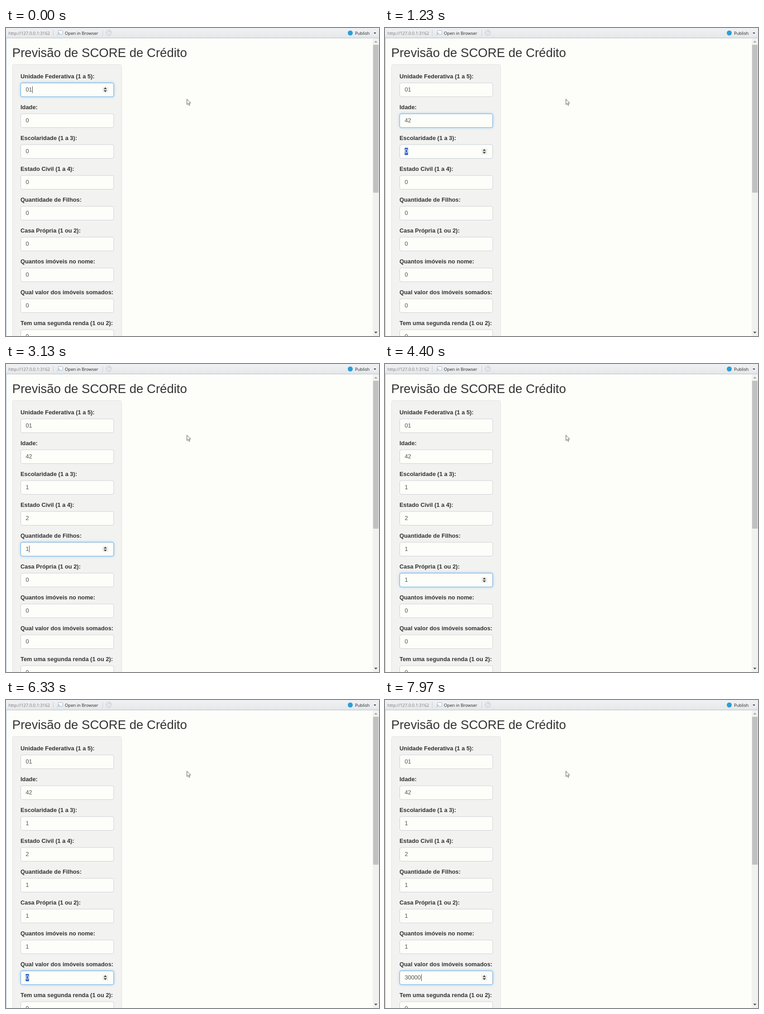
These frames come from a looping animation (824x679 px, 8000 ms). An HTML page:

```html
<!DOCTYPE html>
<html lang="pt">
<head>
<meta charset="utf-8">
<title>Previsão de SCORE de Crédito</title>
<style>
  html, body { margin: 0; width: 100%; height: 100%; overflow: hidden; background: #fdfdf9; }
  svg { display: block; }
  text { font-family: "Liberation Sans", Arial, sans-serif; font-size: 12.87px; fill: #555; white-space: pre; }
  .title { font-size: 27.57px; fill: #333; }
  .label { font-weight: bold; fill: #333; }
  .bar text { font-family: "Open Sans", "Noto Sans", sans-serif; font-size: 9.45px; fill: #222; }
  .bar .url { fill: #777; }
</style>
</head>
<body>
<svg id="stage" width="824" height="679" viewBox="0 0 824 679">
  <defs>
    <linearGradient id="chrome" x2="0" y2="1">
      <stop offset="0" stop-color="#f0f1f3"/>
      <stop offset="1" stop-color="#e5e7ea"/>
    </linearGradient>
    <filter id="blur" x="-10%" y="-60%" width="120%" height="220%">
      <feGaussianBlur stdDeviation="3.4"/>
    </filter>
  </defs>
  <rect width="824" height="679" fill="#fdfdf9"/>

  <text class="title" x="13.8" y="63.5">Previsão de SCORE de Crédito</text>
  <rect x="14.5" y="80.5" width="241" height="620" rx="4" fill="#f2f2f1" stroke="#e2e2e4"/>
  <g id="form"></g>

  <g class="scroll">
    <rect x="810" y="23" width="14" height="656" fill="#f1f1ef"/>
    <rect x="811" y="37" width="12" height="326" fill="#c1c1c1"/>
    <path d="M813.5 32h7l-3.5-4z" fill="#a3a3a3"/>
    <path d="M813.5 669.5h7l-3.5 4z" fill="#505050"/>
  </g>

  <g class="bar">
    <rect width="824" height="22" fill="url(#chrome)"/>
    <path d="M0 22H824M.5 22V679" fill="none" stroke="#a6bdd0"/>
    <path d="M104.500 4V18M213.500 4V18" stroke="#c9ccd0"/>
    <text class="url" x="5.500" y="15">http://127.0.0.1:3162</text>
    <g fill="#f7f9fb" stroke="#a9b9c9">
      <rect x="115.500" y="5.500" width="10" height="8.500" rx="1"/>
      <path d="M112.500 16.500l5-5M114.500 11h3.500v3.500" fill="none"/>
    </g>
    <text x="130" y="15">Open in Browser</text>
    <g fill="none" stroke="#b5bfca">
      <circle cx="227" cy="10.500" r="6" fill="#eef1f4"/>
      <path d="M229.500 8.500a3.200 3.200 0 1 0 .6 3M230 6.800v2.500h-2.600"/>
    </g>
    <circle cx="760.500" cy="11" r="5.500" fill="#2a9fd8"/>
    <text x="771" y="15">Publish</text>
    <path d="M812.500 10h5l-2.500 3z" fill="#222"/>
  </g>

  <path d="M399.700 156.800v12l2.700-2.500 1.900 4.300 1.900-.8-1.900-4.200h3.600z" fill="#fff" stroke="#444" stroke-width=".9"/>
</svg>
<script>
const LOOP = 8000, PITCH = 68, DIGIT = 7.16, FADE = 150, BLINK = 500;

// label, focus time, then [time, typed value] pairs
const fields = [
  ['Unidade Federativa (1 a 5):', -600, [[-400, '0'], [-100, '01']]],
  ['Idade:', 420, [[700, '4'], [860, '42']]],
  ['Escolaridade (1 a 3):', 1210, [[1640, '1']]],
  ['Estado Civil (1 a 4):', 2060, [[2380, '2']]],
  ['Quantidade de Filhos:', 2700, [[2980, '1']]],
  ['Casa Própria (1 ou 2):', 3430, [[3780, '1']]],
  ['Quantos imóveis no nome:', 4700, [[5080, '1']]],
  ['Qual valor dos imóveis somados:', 5860,
    [[6860, '3'], [7200, '30'], [7380, '300'], [7560, '3000'], [7740, '30000']]],
  ['Tem uma segunda renda (1 ou 2):', Infinity, []],
];

const form = document.getElementById('form');

function add(parent, tag, attrs, text) {
  const el = document.createElementNS('http://www.w3.org/2000/svg', tag);
  for (const k in attrs) el.setAttribute(k, attrs[k]);
  if (text) el.textContent = text;
  parent.appendChild(el);
  return el;
}

function makeField([label, start, keys], i) {
  const g = add(form, 'g', { transform: `translate(0 ${i * PITCH})` });
  const box = { x: 32.5, y: 121, width: 205.5, height: 30.5, rx: 3.7 };
  const glow = add(g, 'rect', { ...box, fill: '#66afe9', filter: 'url(#blur)' });
  add(g, 'text', { class: 'label', x: 32, y: 110.8 }, label);
  add(g, 'rect', { ...box, fill: '#fdfdf9', stroke: '#cfcfd6' });
  const ring = add(g, 'rect', { ...box, fill: 'none', stroke: '#66afe9' });
  const mark = add(g, 'rect', { x: 43.5, y: 128, width: 7.3, height: 16, fill: '#3464c8' });
  const value = add(g, 'text', { x: 43.4, y: 140.3 });
  const caret = add(g, 'rect', { y: 128.5, width: 1, height: 15, fill: '#444' });
  const spin = add(g, 'g', {});
  add(spin, 'rect', { x: 213, y: 129.5, width: 13, height: 13, fill: '#efefee' });
  add(spin, 'path', { d: 'M215.7 134.700h7.200l-3.600-4zM215.700 137.300h7.200l-3.600 4z', fill: '#444' });
  const end = i + 1 < fields.length ? fields[i + 1][1] : Infinity;
  return { start, end, keys, glow, ring, mark, value, caret, spin };
}

const views = fields.map(makeField);

const ease = x => {
  const c = Math.min(1, Math.max(0, x));
  return c * c * (3 - 2 * c);
};
const show = (el, on) => el.setAttribute('opacity', on ? 1 : 0);

function render(t) {
  for (const f of views) {
    const last = f.keys.filter(k => k[0] <= t).pop();
    const text = last ? last[1] : '0';
    const active = t >= f.start && t < f.end;
    const selected = active && !last;
    const lit = ease((t - f.start) / FADE) - ease((t - f.end) / FADE);
    f.glow.setAttribute('opacity', lit * 0.6);
    f.ring.setAttribute('opacity', lit);
    f.value.textContent = text;
    f.value.style.fill = selected ? '#fff' : '';
    f.caret.setAttribute('x', Math.round(44 + DIGIT * text.length));
    show(f.mark, selected);
    show(f.spin, active);
    show(f.caret, active && last && (t - last[0]) % (2 * BLINK) < BLINK);
  }
}

const origin = performance.now();
function tick() {
  render((performance.now() - origin) % LOOP);
  requestAnimationFrame(tick);
}
render(0);
tick();
</script>
</body>
</html>
```
